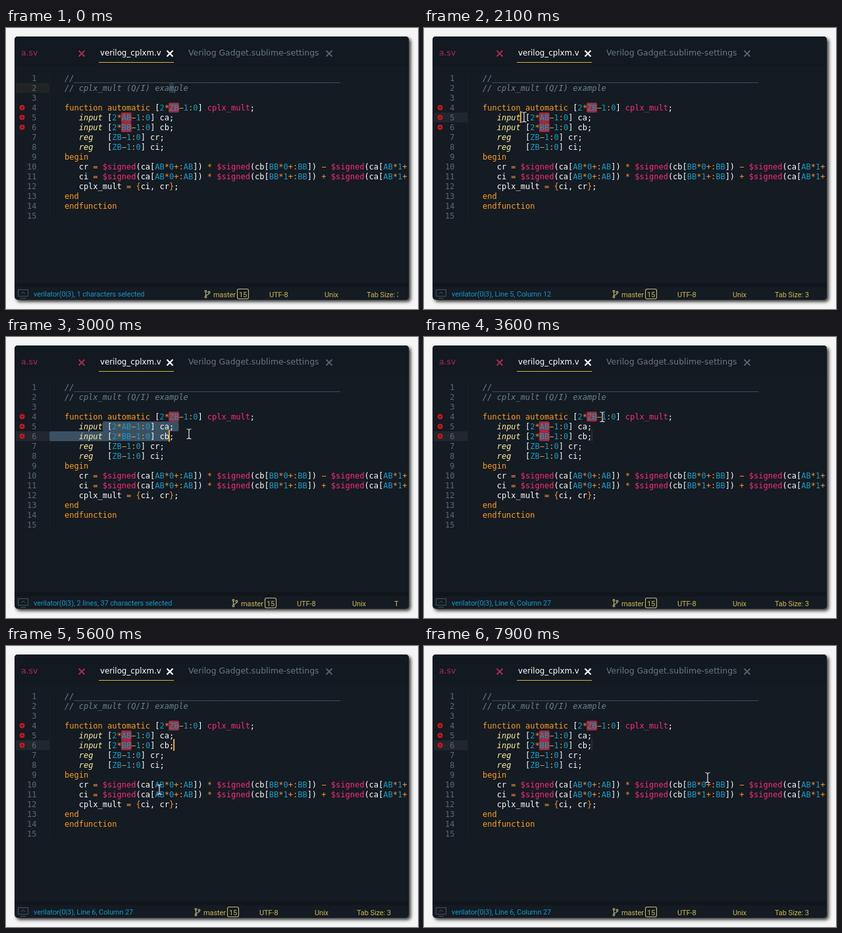
Animation, 626 px wide and 429 px high, one loop 8 s. Source, as an HTML page:

```html
<!DOCTYPE html>
<html lang="en">
<head>
<meta charset="utf-8">
<title>Editor session</title>
<style>
html, body { margin: 0; width: 100%; height: 100%; overflow: hidden; background: #f5f5f5; }
#window { position: absolute; left: 13px; top: 13px; width: 599px; height: 402px; border-radius: 5px;
  background: #141b22; box-shadow: 3px 3px 5px rgba(0,0,0,.8); }
#stage { position: absolute; left: 0; top: 0; }
text { white-space: pre; }
.code { font: 12px "DejaVu Sans Mono", monospace; fill: #fff; }
.tab { font: 12.4px "DejaVu Sans", sans-serif; fill: #677a85; }
.tab .changed { fill: #b02c4f; }
.tab .active { font-size: 11.8px; fill: #fff; }
.status { font: 11px Roboto, sans-serif; letter-spacing: -.1px; fill: #cdb653; }
.comment { fill: #6c828d; font-style: italic; }
.keyword { fill: #ff9d1e; }
.type { fill: #ffefa0; font-style: italic; }
.call { fill: #ff2a78; }
.const { fill: #189bc6; }
.op { fill: #ff912e; }
.num { fill: #596a73; text-anchor: end; }
</style>
</head>
<body>
<div id="window"></div>
<svg id="stage" width="626" height="429" viewBox="0 0 626 429">
  <defs><path id="cross" d="M-4.500-4.500l9 9m0-9l-9 9"/></defs>
  <path d="M18 13H607Q612 13 612 18V58H13V18Q13 13 18 13Z" fill="#121920"/>
  <rect x="13" y="389" width="599" height="7" fill="#10161c"/>
  <path d="M66.500 69V294" stroke="#1a222a"/>
  <g class="tab">
    <text x="23" y="42" class="changed">a.sv</text>
    <text x="143" y="42" class="active">verilog_cplxm.v</text>
    <text x="277" y="42">Verilog Gadget.sublime-settings</text>
  </g>
  <path d="M141 52.500H255" stroke="#d9b13b"/>
  <g stroke-width="1.800">
    <use href="#cross" x="115" y="39" stroke="#b02c4f"/>
    <use href="#cross" x="249" y="39" stroke="#fff" stroke-width="2.200"/>
    <use href="#cross" x="491" y="39" stroke="#56656e"/>
  </g>
  <rect id="row" x="15" width="51" height="15"/>
  <g id="marks"></g>
  <g id="selection"></g>
  <svg width="609" height="429" id="code" class="code"></svg>
  <rect id="caret" width="2" height="18" fill="#f9a825"/>
  <path d="M18.500 399.500h15v10h-15zM22 412.500h8M23 406l3-3 3 3" fill="none" stroke="#46525a"/>
  <svg width="596" height="429" class="status">
    <text id="message" x="42" y="410" fill="#1796c8"></text>
    <g id="info">
      <g fill="none" stroke="#c3b67c" stroke-width="1.100">
        <circle cx="288.500" cy="402" r="1.400"/><circle cx="288.500" cy="410.500" r="1.400"/>
        <circle cx="293.500" cy="403.500" r="1.400"/>
        <path d="M288.500 403.500v5.500M293.500 405q0 2-5 3"/>
        <rect x="336.500" y="398.500" width="17" height="15" rx="2.500"/>
      </g>
      <text x="300" y="411">master</text>
      <text x="339" y="411">15</text>
      <text x="385" y="411">UTF-8</text>
      <text x="469" y="411">Unix</text>
      <text x="533" y="411">Tab Size: 3</text>
    </g>
  </svg>
  <g id="pointer" fill="none">
    <path id="beam" d="M-3.500-7.500Q-.5-7.500 0-6 .5-7.500 3.500-7.500M-3.500 7.500Q-.5 7.500 0 6 .5 7.500 3.500 7.500M0-6V6" stroke-width="1.200"/>
    <use href="#beam" stroke="#e4e6e8"/>
  </g>
</svg>
<script>
const LOOP = 8000, STEP = 100, CHAR = 7.224, LEFT = 89, TOP = 69, ROW = 15;
const $ = id => document.getElementById(id);
const colX = col => LEFT + col * CHAR;
const rowY = line => TOP + (line - 1) * ROW;

function setAttributes(id, values) {
  for (const name in values) $(id).setAttribute(name, values[name]);
}

const lines = `//${'_'.repeat(56)}
// cplx_mult (Q/I) example

function automatic [2*ZB−1:0] cplx_mult;
   input [2*AB−1:0] ca;
   input [2*BB−1:0] cb;
   reg   [ZB−1:0] cr;
   reg   [ZB−1:0] ci;
begin
   cr = $signed(ca[AB*0+:AB]) * $signed(cb[BB*0+:BB]) − $signed(ca[AB*1+:AB])
   ci = $signed(ca[AB*0+:AB]) * $signed(cb[BB*1+:BB]) + $signed(ca[AB*1+:AB])
   cplx_mult = {ci, cr};
end
endfunction
`.split('\n');

const rules = {
  comment: /\/\/.*/,
  keyword: /\b(?:function|automatic|begin|end|endfunction)\b/,
  type: /\b(?:input|reg)\b/,
  call: /\$signed|cplx_mult(?=;)/,
  const: /\b(?:[A-Z]{2}|\d)\b/,
  op: /[*+−=:{}]/
};
const lexer = new RegExp(Object.entries(rules).map(([name, re]) => `(?<${name}>${re.source})`).join('|'), 'g');
const highlight = line => line.replace(lexer, (token, ...rest) => {
  const groups = rest.at(-1);
  return `<tspan class="${Object.keys(groups).find(name => groups[name])}">${token}</tspan>`;
});

$('code').innerHTML = lines.map((line, i) => {
  const y = rowY(i + 1) + 12;
  return `<text class="num" x="46.5" y="${y}">${i + 1}</text><text x="${LEFT}" y="${y}">${highlight(line)}</text>`;
}).join('');

// Every doubled width such as [2*ZB is flagged by the linter
$('marks').innerHTML = lines.map((line, i) => {
  const col = line.indexOf('[2*') + 3, y = rowY(i + 1);
  return col < 3 ? '' : `<rect x="${colX(col) - .9}" y="${y}" width="16" height="${ROW}" rx="2" fill="#a02b3c"/>
    <circle cx="24.5" cy="${y + 7.5}" r="2.600" fill="none" stroke="#cc141c" stroke-width="2.800"/>`;
}).join('');

// Mouse moves: start, end, target x and y, downward bow; it rests in between
const moves = [
  [400, 700, 296, 130], [900, 1200, 282, 150], [1300, 2000, 152, 136], [2200, 2500, 250, 152],
  [2700, 3000, 278, 148], [3100, 3600, 271, 122], [3700, 3900, 234, 119], [4000, 4300, 336, 149],
  [4600, 5600, 233, 219, 40], [5600, 6600, 561, 231], [6700, 7900, 431, 201, 30]
];
// Mouse button: press and, for a drag, release
const presses = [[1200], [2000, 2600], [3100], [3700, 3900], [4400]];

function pointerAt(t) {
  let x = 605, y = 85;
  for (const [start, end, toX, toY, bow = 0] of moves) {
    const k = Math.min(1, Math.max(0, (t - start) / (end - start)));
    const ease = k * k * (3 - 2 * k);
    x += (toX - x) * ease;
    y += (toY - y) * ease + bow * Math.sin(Math.PI * k);
  }
  return [x, y];
}

function textPosition([x, y]) {
  const line = Math.floor((y - TOP) / ROW) + 1;
  return { line, col: Math.min(lines[line - 1].length, Math.floor((x - LEFT) / CHAR)) };
}

const bar = (line, from, to) =>
  `<rect x="${from}" y="${rowY(line)}" width="${to - from}" height="${ROW}" rx="2" fill="#3a5163"/>`;

function draw(t) {
  const [press, release = press] = presses.findLast(([time]) => time <= t) ?? [];
  const idle = press === undefined;
  const changed = Math.min(t, release);
  const anchor = idle ? { line: 2, col: 22 } : textPosition(pointerAt(press));
  const head = idle ? { line: 2, col: 23 } : textPosition(pointerAt(changed));
  const multi = anchor.line !== head.line;
  const [from, to] = [anchor.col, head.col].sort((a, b) => a - b);
  const lineEnd = lines[anchor.line - 1].length + 1;

  let bars = '', shift = 0, message = `Line ${head.line}, Column ${head.col + (head.line > 4 ? 4 : 1)}`;
  if (multi) {
    bars = bar(anchor.line, colX(anchor.col), colX(lineEnd)) + bar(head.line, 66, colX(head.col));
    message = `2 lines, ${lineEnd - anchor.col + head.col - 1} characters selected`;
    shift = 57;
  } else if (from < to) {
    bars = bar(head.line, colX(from), colX(to));
    message = `${to - from} characters selected`;
    shift = 15;
  }
  $('selection').innerHTML = bars;
  $('message').textContent = 'verilator(0|3), ' + message;
  setAttributes('selection', { opacity: idle ? .5 : 1 });
  setAttributes('info', { transform: `translate(${shift})` });
  setAttributes('row', { y: rowY(head.line), fill: idle ? '#212424' : '#1f272f' });

  const phase = (t - changed) % 1000;
  setAttributes('caret', {
    x: colX(head.col) - 1, y: rowY(head.line) - 2,
    opacity: idle ? 0 : phase < 500 ? 1 : phase < 600 ? .12 : 0
  });
  setAttributes('pointer', {
    visibility: t < 500 ? 'hidden' : 'visible',
    transform: `translate(${pointerAt(t)})`
  });
}

function tick() {
  draw(Math.floor(performance.now() % LOOP / STEP) * STEP);
  requestAnimationFrame(tick);
}
tick();
</script>
</body>
</html>
```
